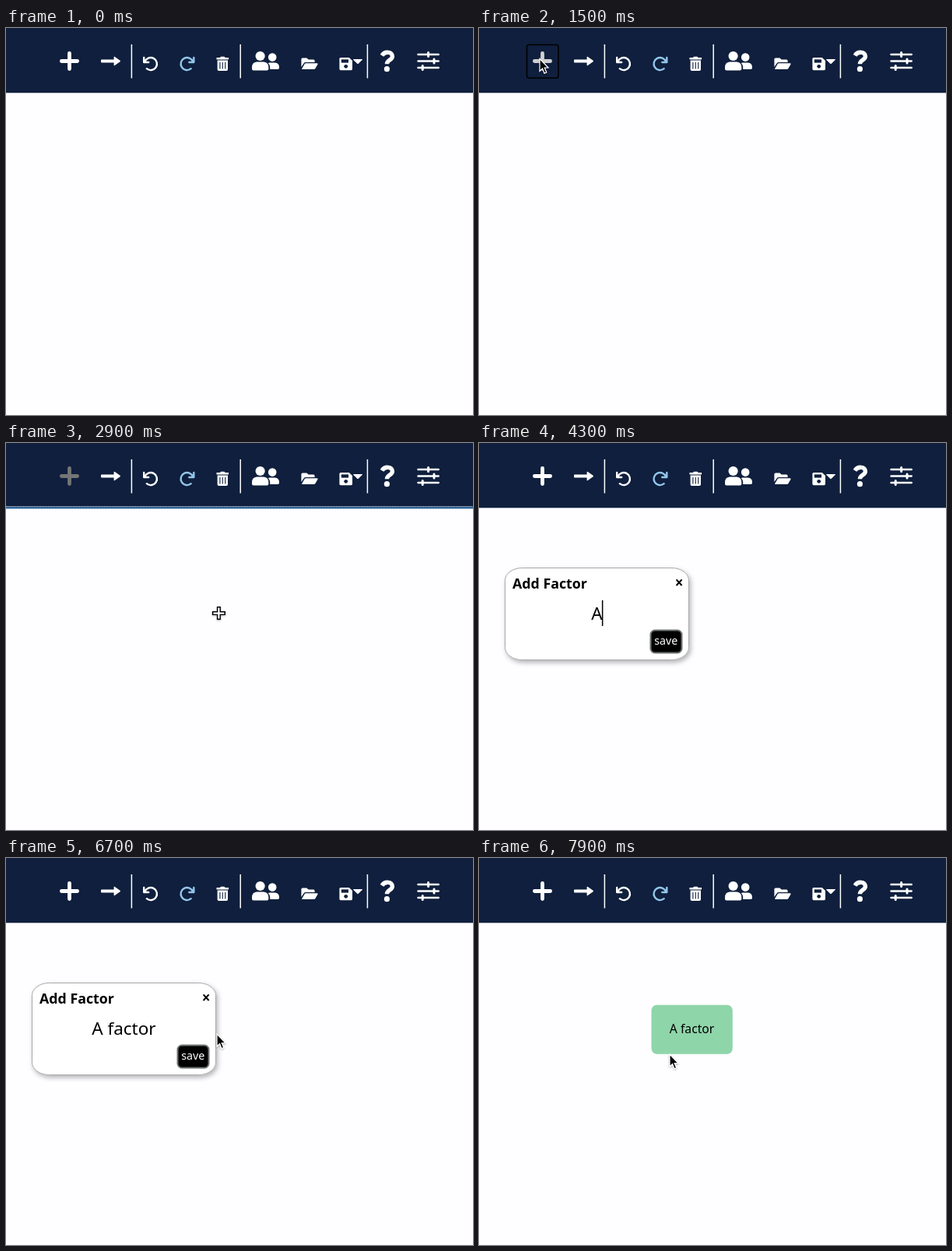
Animation of 600 by 497 pixels, one loop 8000 ms. Source, as an HTML page:

```html
<!DOCTYPE html>
<html lang="en">
<head>
<meta charset="utf-8">
<title>Add factor</title>
<style>
  html, body { margin: 0; width: 100%; height: 100%; overflow: hidden; background: #fefdff; }
  svg { display: block; width: 100vw; height: 100vh; }
  text { font-family: "Noto Sans", "Open Sans", sans-serif; }
  .line { fill: none; stroke: #fff; stroke-linecap: round; stroke-linejoin: round; }
</style>
</head>
<body>
<svg viewBox="0 0 600 497" preserveAspectRatio="none">
  <defs>
    <filter id="soft" x="-20%" y="-20%" width="140%" height="150%">
      <feDropShadow dx="2" dy="3" stdDeviation="3.2" flood-color="#000" flood-opacity=".3"/>
    </filter>
    <filter id="lift" x="-50%" y="-50%" width="200%" height="200%">
      <feDropShadow dx="0" dy="1" stdDeviation=".8" flood-color="#000" flood-opacity=".35"/>
    </filter>
    <g id="turn" fill="none" stroke-width="2.4" stroke-linejoin="round" stroke-linecap="round">
      <path d="M177.2 38v6h6"/>
      <path d="M178.4 43.4A8 8 0 1 1 180.8 52.2"/>
    </g>
    <path id="crossShape" d="M-7 0H7M0-7V7" fill="none"/>
  </defs>

  <rect width="600" height="83.3" fill="#0f1f3d"/>
  <g id="outline">
    <path d="M0 81.5H600" stroke="#fff" stroke-dasharray="1 1"/>
    <rect y="82" width="600" height="2.4" fill="#2c6399"/>
  </g>

  <rect id="hover" x="61.5" y="21.5" width="40.5" height="42.7" rx="3" fill="none" stroke="#000" stroke-width="1.5"/>
  <path id="plus" class="line" stroke-width="4.8" d="M71.4 42.5H91.6M81.5 32.4V52.6"/>

  <g fill="#fff">
    <!-- link arrow -->
    <path d="M123 40.5H138.6V37.6Q138.6 36.2 139.8 37L146.6 41.8Q147.4 42.5 146.6 43.2L139.8 48Q138.6 48.8 138.6 47.4V44.5H123Q122 44.5 122 43.5V41.5Q122 40.5 123 40.5Z"/>
    <!-- separators -->
    <path d="M161.4 21V64.5M301.2 21V64.5M464.4 21V64.5" stroke="#fff" stroke-width="1.5"/>
    <use href="#turn" stroke="#fff"/>
    <use href="#turn" stroke="#93c6ea" transform="translate(418.5) scale(-1 1)"/>
    <!-- bin -->
    <path d="M270.5 38H275L276 36.8H280.5L281.5 38H286V40.4H270.5ZM271.6 41.6H285V53.2Q285 55 283.2 55H273.4Q271.6 55 271.6 53.2Z"/>
    <path d="M274.9 44V52.6M278.3 44V52.6M281.7 44V52.6" stroke="#0f1f3d" stroke-width="1.1"/>
    <!-- people -->
    <circle cx="326.6" cy="36" r="6.1"/>
    <path d="M322 43.4H331.2Q337.3 44 337.3 50.5V52.6Q337.3 54.6 335.3 54.6H318Q316 54.6 316 52.6V50.5Q316 44 322 43.4Z"/>
    <circle cx="342.2" cy="37.6" r="5.3"/>
    <path d="M338.8 44.4H345.5Q351 45 351 50.4V51.2Q351 53 349.2 53H339.3Q339.6 47.4 336.8 45.2Q337.6 44.4 338.8 44.4Z"/>
    <!-- folder -->
    <path d="M379.4 50V40Q379.4 38.4 381 38.4H386.4L388.6 40.6H395Q396.6 40.6 396.6 42.2V44H385.2Q383.4 44 382.5 45.4Z"/>
    <path d="M385.4 45.2H399.6Q401.3 45.2 400.4 46.7L397.4 51.9Q396.8 53 395.4 53H380.8Q379.6 53 380.3 51.9L383.6 46.2Q384.2 45.2 385.4 45.2Z"/>
    <!-- disk -->
    <path d="M430 38H440.8L445 42V52.6Q445 54.2 443.4 54.2H430Q428.4 54.2 428.4 52.6V39.6Q428.4 38 430 38Z"/>
    <path d="M430.8 40.4H440V44.6H430.8Z" fill="#0f1f3d"/>
    <circle cx="436.7" cy="49.3" r="2.4" fill="#0f1f3d"/>
    <path d="M446.6 40H457.4Q458.4 40 457.6 41L452.8 45.8Q452 46.5 451.2 45.8L446.4 41Q445.6 40 446.6 40Z"/>
    <!-- help -->
    <path d="M483 35.4C486.5 29.6 496.4 30 496.4 36.4C496.4 41.2 489.4 40.8 489.4 46.2" class="line" stroke-width="5.4" style="stroke-linecap:butt"/>
    <circle cx="489.4" cy="52.7" r="3.6"/>
    <!-- sliders -->
    <path class="line" stroke-width="2.7" d="M529.6 34H555.6M529.6 42.5H555.6M529.6 51H555.6"/>
    <path class="line" stroke-width="3" d="M542.6 31.4V36.6M550 39.9V45.1M535.2 48.4V53.6"/>
  </g>

  <g id="tip">
    <rect x="12" y="65" width="140.5" height="30" rx="6" fill="#555"/>
    <text x="82" y="84.3" font-size="13.8" text-anchor="middle" fill="#fff">Add factor</text>
  </g>

  <g id="dialog">
    <rect x="33.5" y="160.5" width="236" height="118" rx="22" ry="16" fill="#fff" stroke="#a9a9a9" filter="url(#soft)"/>
    <text x="43" y="187" font-size="17.8" font-weight="700">Add Factor</text>
    <path d="M253.6 175.3L260.6 183M260.6 175.3L253.6 183" stroke="#000" stroke-width="2"/>
    <text id="entry" x="151.4" y="227" font-size="22.5" text-anchor="middle"></text>
    <rect id="caret" y="202" width="1.5" height="33"/>
    <rect id="button" x="220.5" y="240.5" width="40" height="29" rx="5.5" stroke-width="2"/>
    <text x="240.2" y="259.4" font-size="14.2" text-anchor="middle" fill="#fff">save</text>
  </g>

  <g id="node">
    <rect x="221.5" y="188.8" width="104.3" height="63" rx="7" fill="#8fd5aa"/>
    <text x="273.6" y="224.6" font-size="15.7" text-anchor="middle">A factor</text>
  </g>

  <path id="arrow" d="M0 0V15.8L3.6 12.5L6 18.6L8.7 17.5L6.2 11.5H11Z" stroke="#fff" stroke-width="1.2" filter="url(#lift)"/>
  <g id="cross" filter="url(#lift)">
    <use href="#crossShape" stroke="#000" stroke-width="5.8" stroke-linecap="square" transform="scale(.86)"/>
    <use href="#crossShape" stroke="#fff" stroke-width="2.2"/>
  </g>
</svg>

<script>
const LOOP = 8000, STEP = 100;
const part = Object.fromEntries([...document.querySelectorAll("svg [id]")].map(e => [e.id, e]));

const LABEL = "A\u00a0factor";
const KEY_TIMES = [4300, 4500, 4800, 5000, 5100, 5300, 5700, 6000];
const DIALOG_OPEN = 3000, PRESS_SAVE = 7400, DIALOG_CLOSE = 7600;

// [time, x, y]
const POINTER = [
  [200, 286, 287], [300, 286, 225], [400, 278, 124], [500, 170, 66], [600, 114, 46],
  [700, 97, 41], [800, 94, 40], [1000, 94, 40], [1300, 80, 40], [1500, 78, 39.5],
  [1700, 78, 39.5], [1900, 92, 64], [2000, 128, 114], [2200, 206, 172],
  [2400, 258, 209], [2600, 273.4, 218.6], [6600, 273.4, 218.6], [6700, 271, 226],
  [7000, 250, 247], [7200, 245, 252], [LOOP, 245, 252]
];
const TIP_FADE = [[700, 0], [800, .17], [900, .7], [1000, 1], [1300, 1], [1500, 0]];

function along(keys, t) {
  if (t <= keys[0][0]) return keys[0].slice(1);
  const i = keys.findIndex(k => k[0] > t);
  if (i < 0) return keys[keys.length - 1].slice(1);
  const a = keys[i - 1], b = keys[i], u = (t - a[0]) / (b[0] - a[0]);
  return a.slice(1).map((v, n) => v + (b[n + 1] - v) * u);
}

const within = (t, from, to) => t >= from && t < to;
const show = (el, on) => el.setAttribute("visibility", on ? "visible" : "hidden");

function drawDialog(t) {
  const open = within(t, DIALOG_OPEN, DIALOG_CLOSE);
  part.dialog.style.display = open ? "" : "none";
  if (!open) return;
  const typed = KEY_TIMES.filter(k => k <= t);
  const lastKey = typed.length ? typed[typed.length - 1] : DIALOG_OPEN;
  part.entry.textContent = LABEL.slice(0, typed.length);
  const width = typed.length ? part.entry.getComputedTextLength() : 0;
  part.caret.setAttribute("x", 151.2 + width / 2 - (typed.length ? .5 : 0));
  show(part.caret, t < PRESS_SAVE && Math.floor((t - lastKey) / 500) % 2 === 0);
  const pressed = t >= PRESS_SAVE;
  part.button.setAttribute("fill", pressed ? "#222" : "#000");
  part.button.setAttribute("stroke", pressed ? "#444" : "#6f7573");
}

function drawPointer(t) {
  const [x, y] = along(POINTER, t);
  const visible = t >= 200 && !within(t, KEY_TIMES[0], 6700);
  const adding = within(t, 1600, DIALOG_OPEN) && y > 83;
  for (const el of [part.arrow, part.cross]) el.setAttribute("transform", `translate(${x} ${y})`);
  show(part.arrow, visible && !adding);
  show(part.cross, visible && adding);
}

function draw(t) {
  show(part.hover, within(t, 700, 2000));
  show(part.outline, within(t, 2800, DIALOG_OPEN));
  show(part.node, t >= DIALOG_CLOSE);
  part.plus.style.stroke = within(t, 1400, 1600) ? "#d0d0d0" : within(t, 1600, DIALOG_OPEN) ? "#757575" : "#fff";
  part.tip.setAttribute("opacity", along(TIP_FADE, t)[0]);
  drawDialog(t);
  drawPointer(t);
}

const start = performance.now();
function tick() {
  const t = (performance.now() - start) % LOOP;
  draw(Math.floor(t / STEP) * STEP);
  requestAnimationFrame(tick);
}
tick();
</script>
</body>
</html>
```
